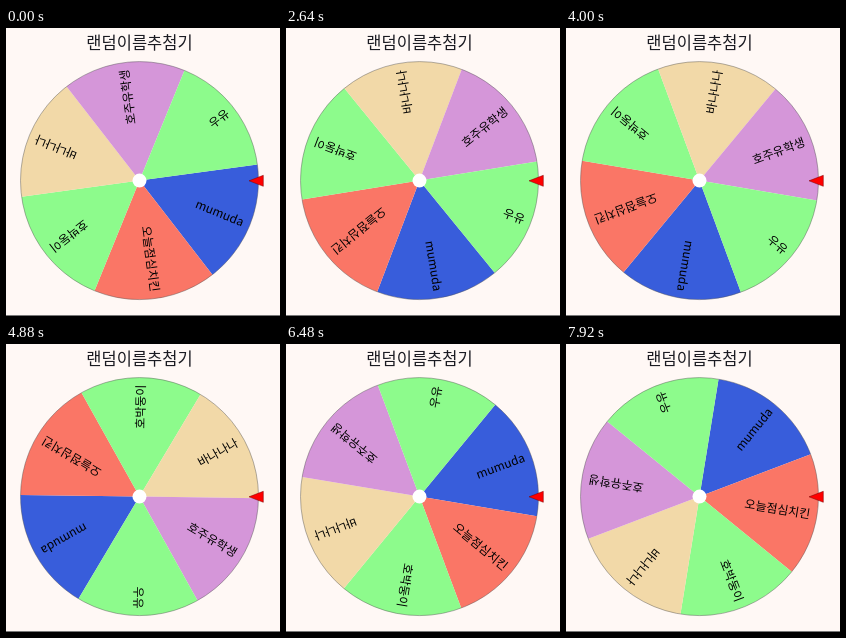
Recreate the animation shown at these times as an HTML page. Size 274 px wide and 288 px high, loop 8 s.

```html
<!DOCTYPE html>
<html lang="ko">
<meta charset="utf-8">
<style>
html, body { margin: 0; width: 100%; height: 100%; overflow: hidden; background: #fff8f5; }
svg { display: block; width: 274px; height: 288px; font-family: "Noto Sans CJK KR", "Noto Sans CJK", sans-serif; }
#title { font-size: 16.5px; font-weight: 500; text-anchor: middle; fill: #1b1b22; }
#wheel text { font-size: 12px; text-anchor: end; }
</style>
<svg viewBox="0 0 274 288">
  <text id="title" x="133.5" y="20.8">랜덤이름추첨기</text>
  <g transform="translate(133.5 152.6)">
    <g id="wheel"></g>
    <circle r="119" fill="none" stroke="#555" stroke-width=".45"/>
    <circle r="7" fill="#fff"/>
  </g>
  <path d="M243 152.8L257.3 147.3V158.3Z" fill="#f00" stroke="#700" stroke-width=".5"/>
  <path d="M0 287.5H274" stroke="#777"/>
</svg>
<script>
const LOOP = 8, STEP = 0.08, R = 119;
const entries = [
  ["mumuda", "#385ddb"],
  ["오늘점심치킨", "#fa7666"],
  ["호박둥이", "#8dfb8c"],
  ["바나나나", "#f2d9a8"],
  ["호주유학생", "#d596d9"],
  ["우유", "#8dfb8c"]
];
const wheel = document.getElementById("wheel");
const dx = R * Math.cos(Math.PI / 6), dy = R / 2;

wheel.innerHTML = entries.map(([name, color], i) => `
  <g transform="rotate(${i * 60})">
    <path d="M0 0L${dx} ${-dy}A${R} ${R} 0 0 1 ${dx} ${dy}Z" fill="${color}"/>
    <text x="112" y="4">${name}</text>
  </g>`).join("");

// Wheel angle in degrees: slow idle turn, about a second of acceleration, long slowdown.
function angle(t) {
  if (t > 3.8) {
    const u = 7.92 - t;
    return 2829.2 - u * (69.01 + u * (114.37 + u * (-3.442 + u * 0.8)));
  }
  const push = Math.max(0, t - 2.823);
  return 22.2 + 22.2 * t + 531.4 * push * push;
}

function draw(now) {
  const t = Math.floor((now / 1000 % LOOP) / STEP + 1e-6) * STEP;
  wheel.setAttribute("transform", `rotate(${angle(t) % 360})`);
  requestAnimationFrame(draw);
}
draw(0);
</script>
</html>
```
